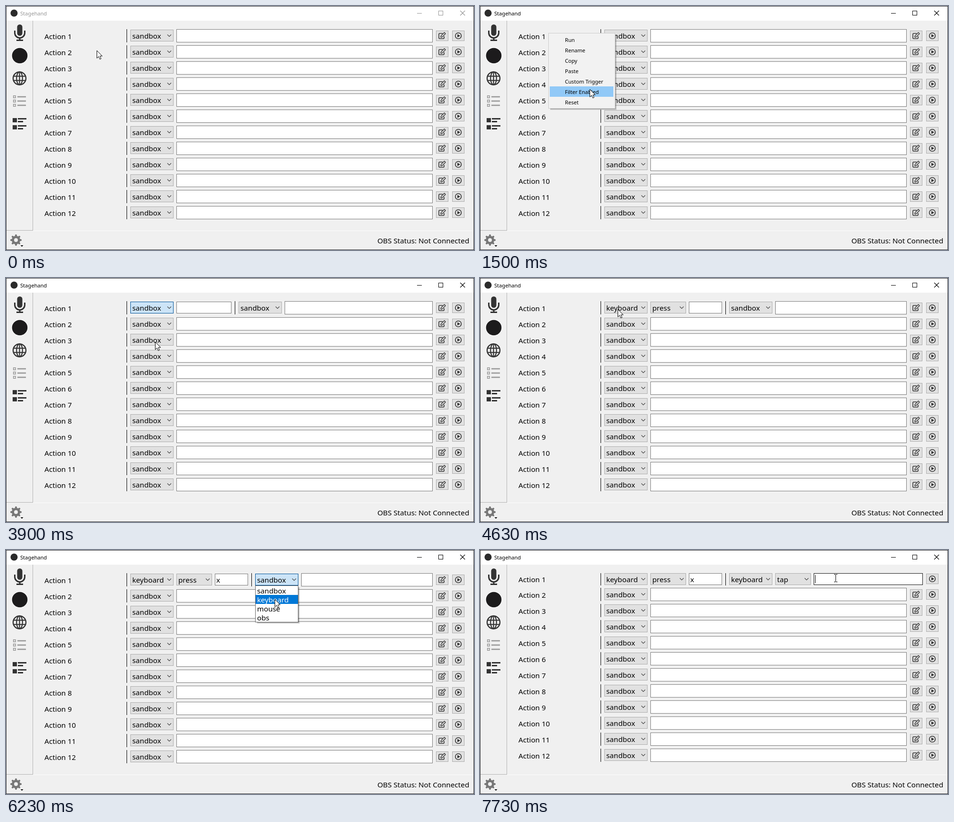
Recreate the animation shown at these times as an HTML page with a canvas. Size 986 by 516 pixels, loop 8000 ms.

```html
<!DOCTYPE html>
<html lang="en">
<head>
<meta charset="utf-8">
<title>Stagehand</title>
<style>
html, body { margin: 0; width: 100%; height: 100%; overflow: hidden; background: #f0f0f0; }
canvas { display: block; width: 986px; height: 516px; }
</style>
</head>
<body>
<canvas id="stage" width="986" height="516"></canvas>
<script>
const ctx = document.getElementById('stage').getContext('2d');
const LOOP = 8000;
const UI = '15.2px "Noto Sans", sans-serif';
const SMALL = '11.1px "Noto Sans", sans-serif';
const MENU = ['Run', 'Rename', 'Copy', 'Paste', 'Custom Trigger', 'Filter Enabled', 'Reset'];
const FILTERS = ['sandbox', 'time', 'window', 'keyboard', 'mouse', 'obs'];
const ACTIONS = ['sandbox', 'keyboard', 'mouse', 'obs'];

// Pointer path: time, x, y
const PATH = [
  [100, 191, 94], [370, 144, 57], [560, 144, 57], [1130, 229, 161], [1470, 229, 161],
  [1500, 231, 176], [1670, 232, 177], [2030, 232, 177], [2600, 318, 62], [2830, 318, 62],
  [2960, 318, 64], [3530, 314, 135], [3960, 314, 135], [4650, 290, 66], [4730, 290, 66],
  [5020, 470, 61], [5300, 476, 61], [5530, 559, 57], [5700, 559, 57], [6200, 566, 104],
  [6530, 566, 104], [6820, 690, 68], [6860, 691, 68], [7260, 730, 60], [7600, 749, 59]
];

// Control colours: fill and border
const NORMAL = [[225, 225, 225], [173, 173, 173]];
const HOVER = [[229, 241, 251], [0, 120, 215]];
const PRESSED = [[204, 228, 247], [0, 84, 153]];
const EDGE = [122, 122, 122], EDGE_HOVER = [23, 23, 23], EDGE_FOCUS = [0, 120, 215];

const ramp = (t, a, b) => Math.min(1, Math.max(0, (t - a) / (b - a)));
const pulse = (t, a, b, c, d) => ramp(t, a, b) * (1 - ramp(t, c, d));
const mix = (a, b, k) => a.map((v, i) => v + (b[i] - v) * k);
const rgb = c => `rgb(${c.map(Math.round)})`;
const blend = (a, b, k) => [mix(a[0], b[0], k), mix(a[1], b[1], k)];

function rect(x, y, w, h, fill) {
  ctx.fillStyle = fill;
  ctx.fillRect(x, y, w, h);
}

function box(x, y, w, h, fill, edge) {
  rect(x, y, w, h, edge);
  rect(x + 1, y + 1, w - 2, h - 2, fill);
}

function text(s, x, y, font = UI, fill = '#000', align = 'left') {
  ctx.font = font;
  ctx.textAlign = align;
  ctx.fillStyle = fill;
  ctx.fillText(s, x, y);
}

function poly(points, close) {
  ctx.beginPath();
  points.forEach(([x, y]) => ctx.lineTo(x, y));
  if (close) ctx.closePath();
}

function line(points, width, color) {
  poly(points);
  ctx.lineWidth = width;
  ctx.strokeStyle = color;
  ctx.stroke();
}

function disc(x, y, r, fill) {
  ctx.beginPath();
  ctx.arc(x, y, r, 0, 7);
  ctx.fillStyle = fill;
  ctx.fill();
}

function ring(x, y, rx, ry, width, color) {
  ctx.beginPath();
  ctx.ellipse(x, y, rx, ry, 0, 0, 7);
  ctx.lineWidth = width;
  ctx.strokeStyle = color;
  ctx.stroke();
}

function combo(x, y, w, label, look = NORMAL) {
  box(x, y, w, 25, rgb(look[0]), rgb(look[1]));
  text(label, x + 4, y + 19);
  const cx = x + w - 9;
  line([[cx - 4, y + 10.5], [cx, y + 14.5], [cx + 4, y + 10.5]], 1.1, '#444');
}

const field = (x, y, w, h, edge = EDGE) => box(x, y, w, h, '#fff', rgb(edge));
const divider = (x, y, h) => rect(x, y, 1, h, '#000');

function editButton(y) {
  box(906, y, 26, 22, '#e1e1e1', '#adadad');
  ctx.lineJoin = 'round';
  line([[920, y + 6], [913, y + 6], [912, y + 7], [912, y + 16], [913, y + 17], [922, y + 17], [923, y + 16], [923, y + 12]], 1.6, '#333');
  poly([[916, y + 14], [916.5, y + 11], [923.5, y + 4], [926, y + 6.5], [919, y + 13.5]], true);
  ctx.lineWidth = 1.4;
  ctx.stroke();
  ctx.lineJoin = 'miter';
}

function playButton(y) {
  box(940, y, 26, 22, '#e1e1e1', '#adadad');
  ring(953, y + 11, 6.3, 6.3, 1.6, '#333');
  poly([[951, y + 7.5], [951, y + 14.5], [957, y + 11]], true);
  ctx.fillStyle = '#333';
  ctx.fill();
}

function sidebar() {
  const dark = '#333', gray = '#999';
  rect(56, 31, 1, 444, '#b4b4b4');
  rect(1, 474, 56, 1, '#b4b4b4');
  rect(57, 475, 928, 1, '#fcfcfc');

  ctx.fillStyle = dark;
  ctx.beginPath();
  ctx.roundRect(23.5, 39, 11, 24, 5.5);
  ctx.fill();
  ctx.beginPath();
  ctx.moveTo(18.5, 52);
  ctx.lineTo(18.5, 57);
  ctx.arc(29, 57, 10.5, Math.PI, 0, true);
  ctx.lineTo(39.5, 52);
  ctx.lineWidth = 3;
  ctx.strokeStyle = dark;
  ctx.stroke();
  rect(27.5, 67, 3, 5, dark);
  rect(22, 71, 14, 3, dark);

  disc(29, 105, 17.5, '#fafafa');
  disc(29, 105, 16.3, '#1c1b1c');

  ring(28.5, 153, 13.5, 13.5, 2.4, dark);
  ring(28.5, 153, 6.3, 13.5, 2.2, dark);
  line([[28.5, 140], [28.5, 166]], 2.2, dark);
  for (const y of [148.5, 157.5]) line([[16, y], [41, y]], 2.2, dark);

  for (const y of [192, 201, 210]) {
    ctx.lineWidth = 1.5;
    ctx.strokeStyle = gray;
    ctx.strokeRect(15.7, y - 2.2, 4.4, 4.4);
    rect(24, y - 1.3, 18, 2.6, gray);
  }
  for (const y of [237, 252]) {
    rect(14, y, 9, 9, dark);
    rect(25, y, 18, 3, dark);
    rect(25, y + 6, 11, 3, dark);
  }
}

function gear(cx, cy) {
  const points = [];
  for (let i = 0; i < 32; i++) {
    const a = (i - 1.5) * Math.PI / 16 - Math.PI / 2;
    const r = i % 4 === 1 || i % 4 === 2 ? 12 : 8.8;
    points.push([cx + r * Math.cos(a), cy + r * Math.sin(a)]);
  }
  poly(points, true);
  ctx.fillStyle = '#777';
  ctx.fill();
  disc(cx, cy, 4, '#f0f0f0');
  poly([[30.5, 506], [36.5, 506], [33.5, 509]], true);
  ctx.fillStyle = '#000';
  ctx.fill();
}

function titleBar(t) {
  const ink = rgb(mix([150, 150, 150], [0, 0, 0], ramp(t, 90, 170)));
  rect(1, 1, 984, 30, '#fff');
  disc(17, 15, 7.5, '#2b2b2b');
  text('Stagehand', 30, 20, SMALL, ink);
  rect(866, 15, 10, 1, ink);
  ctx.strokeStyle = ink;
  ctx.lineWidth = 1;
  ctx.strokeRect(911.5, 10.5, 9, 9);
  line([[957, 10], [967, 20]], 1.1, ink);
  line([[967, 10], [957, 20]], 1.1, ink);
}

function plainRow(i, shift, look) {
  const y = 49 + 34 * i - shift;
  text('Action ' + (i + 1), 81, y + 21);
  divider(254, y, 28);
  combo(262, y + 1, 91, 'sandbox', look);
  field(359, y, 540, 28);
  editButton(y + 3);
  playButton(y + 3);
}

// Row with the filter: look of each control depends on time
function firstRow(t, phase) {
  const up = phase === 3 ? 1 : 0;
  const y = 50 - up;
  let first = blend(NORMAL, HOVER, pulse(t, 2440, 2700, 3960, 4000));
  if (t >= 2830) first = blend(NORMAL, PRESSED, pulse(t, 2800, 2880, 4000, 4450));

  text('Action 1', 81, 70 - 2 * up);
  divider(254, 49, up ? 26 : 28);
  combo(262, y, 91, phase === 1 ? 'sandbox' : 'keyboard', first);

  if (phase === 1) {
    field(359, y, 116, 25);
    divider(482, 49, 28);
    combo(490, y, 91, 'sandbox');
    field(587, 49, 312, 28);
  } else {
    combo(359, y, 75, 'press', blend(NORMAL, HOVER, pulse(t, 4820, 4900, 4940, 5150)));
    const hot = mix(EDGE, EDGE_HOVER, ramp(t, 4950, 5050));
    const focus = mix(hot, EDGE_FOCUS, ramp(t, 5090, 5250));
    const dim = mix(focus, [8, 80, 140], ramp(t, 5450, 5630));
    field(440, y, 70, 25, mix(dim, EDGE, ramp(t, 5640, 5800)));
    if (t >= 5290) text('x', 443, y + 19);
    else if (t >= 5090) rect(443, y + 4, 1, 17, '#000');

    divider(517, 49, up ? 26 : 28);
    let second = blend(NORMAL, HOVER, ramp(t, 5420, 5560));
    if (t > 5640) second = blend(HOVER, PRESSED, ramp(t, 5640, 5720));
    if (t > 6600) second = blend(PRESSED, NORMAL, ramp(t, 6600, 7060));
    combo(525, y, 91, up ? 'keyboard' : 'sandbox', second);
    if (up) {
      combo(622, y, 75, 'tap', blend(NORMAL, HOVER, pulse(t, 6740, 6890, 7120, 7450)));
      field(703, 49, 230, 25, mix(EDGE, EDGE_HOVER, ramp(t, 7150, 7450)));
      if (t >= 7700) rect(706, 53, 1, 17, '#000');
    } else {
      field(622, 49, 277, 28);
    }
  }
  if (!up) editButton(52);
  playButton(52 - 2 * up);
}

function shadow(x, y, w, h) {
  for (let i = 3; i > 0; i--) {
    rect(x + 4, y + h + i - 1, w - 4 + i, 1, `rgba(0,0,0,${0.45 - i * 0.12})`);
    rect(x + w + i - 1, y + 4, 1, h - 4 + i - 1, `rgba(0,0,0,${0.45 - i * 0.12})`);
  }
}

function contextMenu(t, p) {
  if (t < 530 || t >= 2000) return;
  ctx.globalAlpha = ramp(t, 510, 690);
  shadow(144, 57, 141, 160);
  box(144, 57, 141, 160, '#f2f2f2', '#ccc');
  const hot = p.x > 147 ? Math.floor((p.y - 60) / 22) : -1;
  MENU.forEach((label, i) => {
    if (i === hot) rect(147, 60 + 22 * i, 134, 22, '#91c9f7');
    text(label, 179, 76 + 22 * i, SMALL);
  });
  ctx.globalAlpha = 1;
}

// List that rolls down from under its combo box
function dropList(t, from, to, x, items, p) {
  if (t < from || t >= to) return;
  const full = items.length * 19 + 2;
  const open = Math.round(full * ramp(t, from, from + 70));
  const top = 75 + open - full;
  if (open === full) shadow(x, 75, 91, full);
  ctx.save();
  ctx.beginPath();
  ctx.rect(x, 75, 91, open);
  ctx.clip();
  box(x, top, 91, full, '#fff', '#646464');
  const hot = Math.max(0, Math.floor((p.y - 76) / 19));
  items.forEach((label, i) => {
    const y = top + 1 + 19 * i;
    if (i === hot) rect(x + 1, y, 89, 19, '#0078d7');
    text(label, x + 4, y + 15.5, UI, i === hot ? '#fff' : '#000');
  });
  ctx.restore();
}

function pointer(t) {
  const n = PATH.findIndex(k => k[0] > t);
  const a = PATH[n < 0 ? PATH.length - 1 : Math.max(0, n - 1)];
  const b = n < 0 ? a : PATH[n];
  const k = a === b ? 0 : ramp(t, a[0], b[0]);
  const e = k * k * (3 - 2 * k);
  return { x: Math.round(a[1] + (b[1] - a[1]) * e), y: Math.round(a[2] + (b[2] - a[2]) * e) };
}

function drawPointer({ x, y }, phase) {
  const overText = phase === 2 ? x > 440 && x < 510 && y < 75
    : phase === 3 && (x > 703 || (y >= 80 && x > 620));
  if (overText) {
    rect(x, y - 7, 1, 15, '#000');
    for (const dy of [-8, 8]) {
      rect(x - 3, y + dy, 3, 1, '#000');
      rect(x + 1, y + dy, 3, 1, '#000');
    }
    return;
  }
  poly([[0, 0], [0, 16], [3.7, 12.6], [6.2, 18.3], [8.8, 17.2], [6.4, 11.6], [11.3, 11.6]]
    .map(([dx, dy]) => [x + dx + 0.5, y + dy + 0.3]), true);
  ctx.fillStyle = '#fff';
  ctx.fill();
  ctx.lineWidth = 1;
  ctx.strokeStyle = '#000';
  ctx.stroke();
}

function draw(t) {
  const p = pointer(t);
  const phase = [2020, 3960, 6530].filter(at => t >= at).length;
  box(0, 0, 986, 516, '#f0f0f0', '#2e2e30');
  titleBar(t);
  sidebar();
  gear(21, 495);
  text('OBS Status: Not Connected', 976, 502, UI, '#000', 'right');

  if (phase) firstRow(t, phase);
  else plainRow(0, 0);
  for (let i = 1; i < 12; i++) {
    const glow = i === 1 ? pulse(t, 2280, 2420, 2500, 2800) : 0;
    plainRow(i, phase === 3 ? 3 : 0, blend(NORMAL, HOVER, glow));
  }

  contextMenu(t, p);
  dropList(t, 2870, 3900, 262, FILTERS, p);
  dropList(t, 5620, 6470, 525, ACTIONS, p);
  drawPointer(p, phase);
}

const start = performance.now();
function tick() {
  draw((performance.now() - start) % LOOP);
  requestAnimationFrame(tick);
}
draw(0);
requestAnimationFrame(tick);
</script>
</body>
</html>
```
